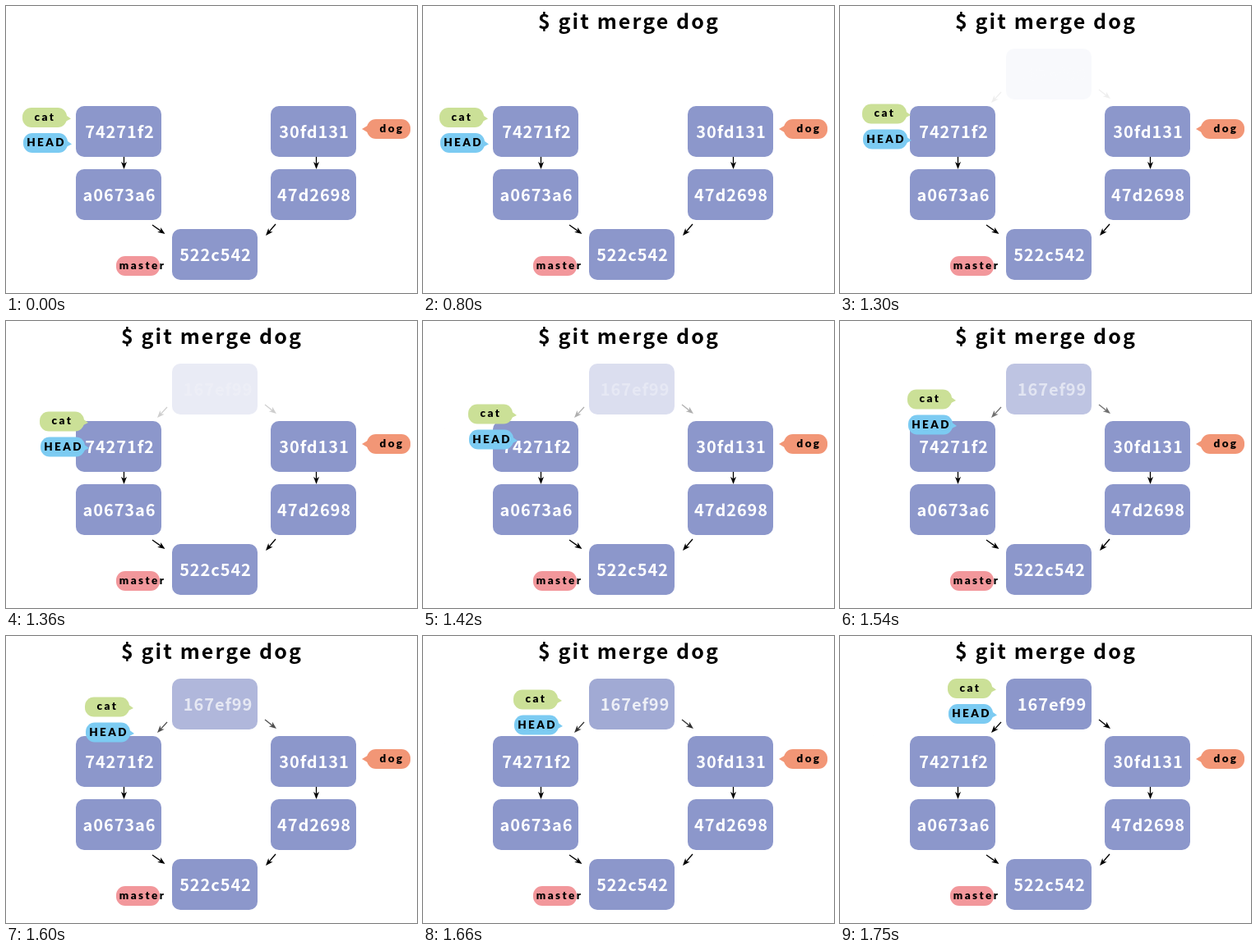
Write an HTML page that moves like this. It is 500 px wide and 350 px high and loops after 2750 ms.

```html
<!DOCTYPE html>
<html lang="en">
<head>
<meta charset="utf-8">
<title>git merge</title>
<style>
html, body { margin: 0; width: 100%; height: 100%; overflow: hidden; background: #fff; }
svg { display: block; }
text { text-anchor: middle; }
.title, .hash { font-family: "Noto Sans CJK JP", "Noto Sans CJK SC", "Noto Sans CJK", "Noto Sans", sans-serif; font-weight: 700; }
.title { font-size: 25px; letter-spacing: 2.1px; }
.hash { font-size: 20px; letter-spacing: .9px; fill: #fff; }
.label { font: 900 13.5px Lato, sans-serif; letter-spacing: 2.4px; }
.box { fill: #8c97cb; }
.arrow line { stroke: #000; stroke-width: 1.3; }
</style>
</head>
<body>
<svg id="stage" width="500" height="350" viewBox="0 0 500 350"></svg>
<script>
const LOOP = 2750, TITLE_AT = 800, MERGE_AT = 1300, STEP = 30, STEPS = 16;

const box = (x, y, hash, textX, base) =>
  `<rect class="box" x="${x}" y="${y}" width="104" height="62" rx="10"/>
   <text class="hash" x="${textX}" y="${base}">${hash}</text>`;

const arrow = (x1, y1, x2, y2) => {
  const length = Math.hypot(x2 - x1, y2 - y1);
  const angle = Math.atan2(y2 - y1, x2 - x1) * 180 / Math.PI;
  return `<g class="arrow" transform="translate(${x2} ${y2}) rotate(${angle})">
    <line x1="${-length}" x2="-5"/><path d="M0 0L-9 -3.5L-6.5 0L-9 3.5Z"/></g>`;
};

// The tip points right, left, or is absent.
const tips = { right: "M50 7L59 13.5L50 18Z", left: "M4 6L-6 12L4 18Z", none: "" };
const tag = (x, y, width, color, name, textX, base, tip) =>
  `<g transform="translate(${x} ${y})"><g fill="${color}">
    <rect width="${width}" height="24" rx="11"/><path d="${tips[tip]}"/></g>
    <text class="label" x="${textX}" y="${base}">${name}</text></g>`;

stage.innerHTML = `
  <text class="title" id="command" x="250.5" y="28">$ git merge dog</text>
  ${box(85, 122, "74271f2", 138.5, 161)}
  ${box(322, 122, "30fd131", 375, 161)}
  ${box(85, 199, "a0673a6", 138, 237.5)}
  ${box(322, 199, "47d2698", 375, 237.5)}
  ${box(202, 272, "522c542", 255, 310.5)}
  ${arrow(143.5, 184, 143.5, 199)}
  ${arrow(377.5, 184, 377.5, 199)}
  ${arrow(178, 267, 193.5, 278)}
  ${arrow(328, 266, 316, 280)}
  <g id="merged">
    ${box(202, 52, "167ef99", 258, 90.5)}
    ${arrow(196, 105, 184, 118)}
    ${arrow(315, 102, 329, 113)}
  </g>
  ${tag(439, 138, 53, "#f29676", "dog", 30.5, 16, "left")}
  ${tag(134, 305, 53, "#f2979b", "master", 32, 16, "none")}
  <g id="head">
    ${tag(20, 124, 54, "#cbe097", "cat", 27.5, 15.5, "right")}
    ${tag(21, 155, 54, "#7ccbf2", "HEAD", 28, 16, "right")}
  </g>`;

const start = performance.now();

function draw(now) {
  const t = Math.max(0, now - start) % LOOP;
  const step = t < MERGE_AT ? 0 : Math.min(STEPS, Math.floor((t - MERGE_AT) / STEP) + 1);
  const p = step / STEPS;
  command.style.visibility = t < TITLE_AT ? "hidden" : "visible";
  // Box, hash and arrows fade separately, so the hash tints with the box.
  for (const part of merged.children) part.style.opacity = p;
  head.setAttribute("transform", `translate(${Math.round(111 * p)} ${-72 * p})`);
  requestAnimationFrame(draw);
}
draw(start);
</script>
</body>
</html>
```
